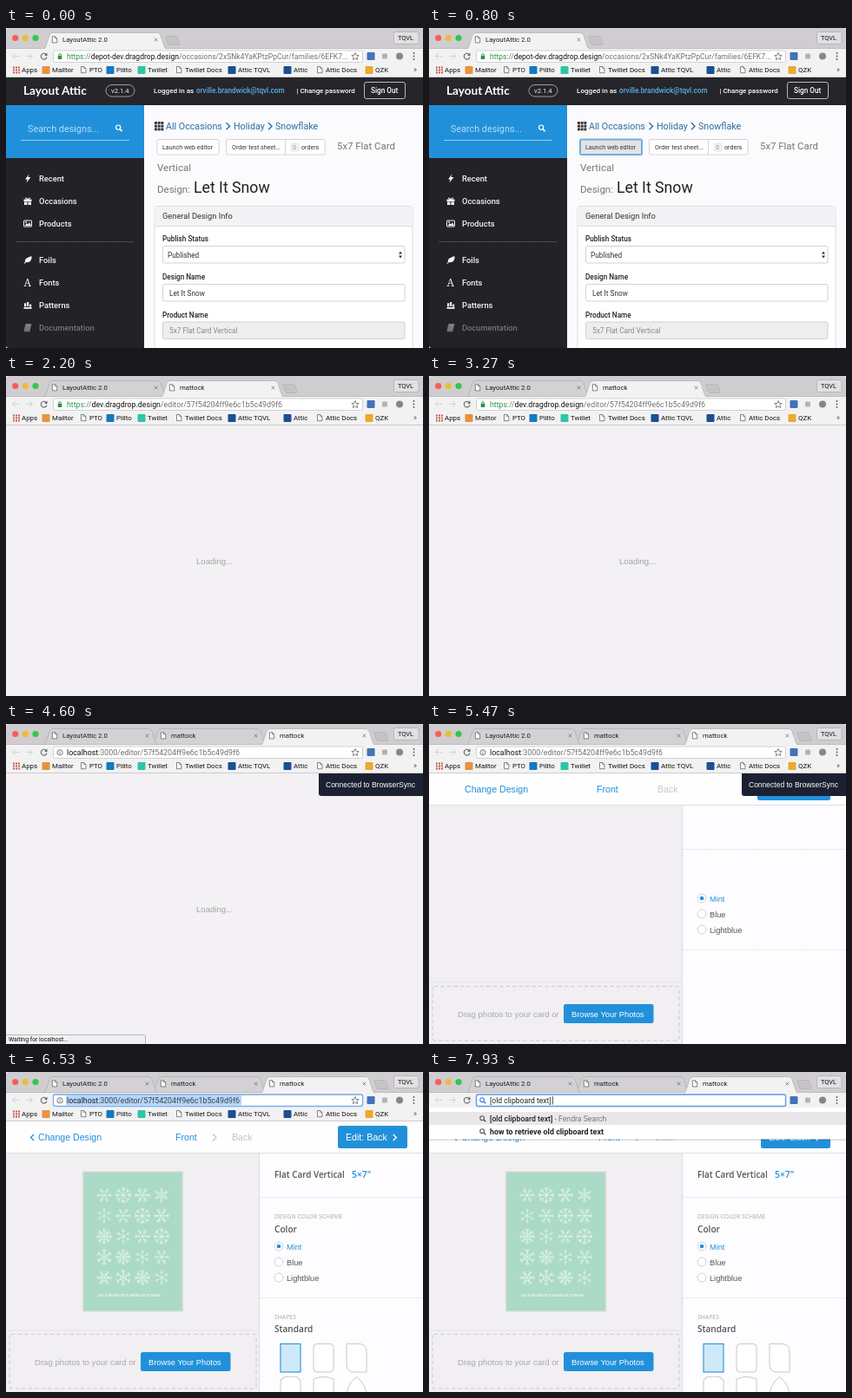
Write an HTML page that moves like this. It is 480x369 px and loops after 8000 ms.

```html
<!DOCTYPE html>
<html lang="en">
<head>
<meta charset="utf-8">
<title>Opening a design in the local editor</title>
<style>
  html, body { margin: 0; width: 100%; height: 100%; overflow: hidden; background: #fff; }
  svg { display: block; width: 100%; height: 100%; font-family: Roboto, sans-serif; }
  text { white-space: pre; }
  .helv { font-family: "Liberation Sans", Arial, sans-serif; }
  .open { font-family: "Open Sans", sans-serif; }
  .lato { font-family: Lato, sans-serif; }
  .serif { font-family: "Noto Serif", serif; }
  .mid { font-weight: 500; }
  .semi { font-weight: 600; }
  .bold { font-weight: 700; }
</style>
</head>
<body>
<svg id="stage" viewBox="0 0 480 369" preserveAspectRatio="none"></svg>
<script>
const LOOP = 8000;
const BLUE = '#2190da', INK = '#252428', GREY = '#727073', LINK = '#2c6ca4';

// Moments at which the picture switches, in ms
const at = {
  hover: 330, press: 600, tab2: 1530, boot2: 2130, tab3: 3340, boot3: 4400,
  sync: 4480, idle: 4870, editor: 5130, fonts: 5800, select: 6270, syncEnd: 6400,
  paste: 7130, suggest: 7330
};

const text = (x, y, size, str, fill = INK, cls = '') =>
  `<text x="${x}" y="${y}" font-size="${size}" fill="${fill}" class="${cls}">${str}</text>`;
const rect = (x, y, w, h, fill, r = 0, stroke = 'none', extra = '') =>
  `<rect x="${x}" y="${y}" width="${w}" height="${h}" fill="${fill}" rx="${r}" stroke="${stroke}" ${extra}/>`;
const circle = (x, y, r, fill, stroke = 'none') =>
  `<circle cx="${x}" cy="${y}" r="${r}" fill="${fill}" stroke="${stroke}"/>`;
const line = (d, stroke, width = 1, extra = '') =>
  `<path d="${d}" fill="none" stroke="${stroke}" stroke-width="${width}" ${extra}/>`;
const shape = (d, fill, extra = '') => `<path d="${d}" fill="${fill}" ${extra}/>`;
const group = (x, y, body) => `<g transform="translate(${x} ${y})">${body}</g>`;
const during = (from, to, body) => `<g data-from="${from}" data-to="${to}">${body}</g>`;
const span = (str, fill) => `<tspan fill="${fill}">${str}</tspan>`;

const docIcon = (x, y) =>
  shape(`M${x} ${y}h3.2l2.2 2.2v5h-5.400z`, '#fff', 'stroke="#666" stroke-width=".8"') +
  line(`M${x + 3.2} ${y}v2.2h2.2`, '#666', .7);
const lens = (x, y, color, s = 1) => group(x, y,
  `<circle cx="${-.8 * s}" cy="${-.8 * s}" r="${2.4 * s}" fill="none" stroke="${color}" stroke-width="${1.1 * s}"/>` +
  line(`M${s} ${s}l${2.3 * s} ${2.3 * s}`, color, 1.4 * s));
const chevron = (x, y, color, s = 3, width = 1.2) =>
  line(`M${x - s / 2} ${y - s}l${s} ${s}l${-s} ${s}`, color, width);
const dots = (x, y, n, step, size, color) => {
  let out = '';
  for (let i = 0; i < n * n; i++)
    out += rect(x + i % n * step, y + Math.floor(i / n) * step, size, size, color);
  return out;
};

/* ---------- browser frame ---------- */

function toolbar() {
  const bookmarks = [
    [18, 'Apps'], [53, 'Mailtor', '#e8923c'], [96, 'PTO'], [127, 'Pillto', '#1579bf'],
    [163, 'Twillet', '#2fc4a8'], [206, 'Twillet Docs'], [267, 'Attic TQVL', '#1c4f94'],
    [331, 'Attic', '#1c4f94'], [368, 'Attic Docs'], [425, 'QZK', '#eba92d']
  ];
  const marks = bookmarks.map(([x, label, color]) => {
    const icon = color ? rect(x - 11.5, 44, 9, 9, color, 1)
      : label === 'Apps' ? dots(8, 44.5, 3, 3, 2, '#c9604e') : docIcon(x - 9.5, 44.5);
    return icon + text(x, 51, 7.9, label, '#111');
  }).join('');
  return rect(0, 24, 480, 33, '#f3f2f3') +
    line('M15 32.500H7.500M11 29L7.500 32.500L11 36M23 32.500h7.500M27 29l3.500 3.500l-3.500 3.500', '#d3d1d4', 1) +
    line('M46.300 30.500A3.400 3.400 0 1 0 47 33.500', '#666', 1.1) + shape('M47.500 28.500v3.500h-3.500z', '#666') +
    rect(54.5, 26, 356, 13.500, '#fff', 2, '#c9c7ca', 'stroke-width=".8"') +
    line('M402 28.500l1.200 2.900 3 .200-2.300 2 .700 3-2.600-1.600-2.600 1.600.700-3-2.300-2 3-.200z', '#666', .8) +
    rect(415.5, 28, 9, 9, '#4272ba', 1) + rect(433, 29.5, 6, 6, '#b5b3b3', 1) +
    circle(453, 32.5, 4, '#85878a') +
    [29, 32.5, 36].map(y => circle(469.5, y, .9, '#555')).join('') +
    marks + text(469, 51, 8.5, '»', '#555') + rect(0, 56.2, 480, .8, '#c6c4c6');
}

function addresses() {
  const lock = rect(59.700, 31.900, 4.600, 4, '#2a9445', .6) + line('M60.700 32v-1a1.300 1.300 0 0 1 2.600 0v1', '#2a9445', .9);
  const info = line('M58.900 32.800a3.100 3.100 0 1 1 6.200 0a3.100 3.100 0 1 1-6.200 0', '#555', .8) +
    rect(61.600, 32.300, .8, 2.300, '#555') + rect(61.600, 30.900, .8, .8, '#555');
  const path = '/editor/57f54204ff9e6c1b5c49d9f6';
  const secure = (host, rest, size) => lock +
    text(70, 35.7, size, span('https', '#2a9445') + span('://', GREY) + span(host, '#111') + span(rest, GREY));
  const local = (host, rest) => info + text(70, 35.7, 8.85, span('localhost', host) + span(':3000' + path, rest));
  return during(0, at.tab2, secure('depot-dev.dragdrop.design', '/occasions/2xSNk4YaKPtzPpCur/families/6EFK7...', 8.55)) +
    during(at.tab2, at.tab3, secure('dev.dragdrop.design', path, 8.8)) +
    during(at.tab3, at.select, local('#111', GREY)) +
    during(at.select, at.paste, rect(54.5, 26, 356, 13.500, 'none', 2, '#79aee9', 'stroke-width="1.4"') +
      rect(69, 27.200, 202, 11.300, '#b3d4fb') + local('#222', '#444'));
}

function suggestions() {
  const query = '[old clipboard text]';
  const box = h => rect(0, 41, 480, h + 1.5, '#0002') + rect(0, 41, 480, h, '#fff') +
    rect(0, 46, 480, 15, '#e9e7e9') + lens(62, 54, '#555') +
    text(70, 56.5, 8.7, `<tspan class="mid">${query}</tspan>` + span(' - Fendra Search', '#777'), '#222');
  return during(at.paste, LOOP, rect(54.5, 26, 356, 13.500, '#fff', 2, '#5b9fe8', 'stroke-width="1.4"') +
      lens(62, 33, '#3b7de0') + text(70, 35.7, 8.6, query, '#222') + rect(142, 28, .7, 9.500, '#222')) +
    during(at.paste, at.suggest, box(22)) +
    during(at.suggest, LOOP, box(36.5) + lens(62, 69, '#555') +
      text(70, 71.5, 8.9, 'how to retrieve old clipboard text', '#222', 'bold'));
}

/* ---------- catalogue page ---------- */

function sidebar() {
  const white = '#f4f4f6', dim = '#77767b';
  const icons = [
    shape('M1.500-5L-3 1h2.500L-1.500 5L3.500-1.500H.5z', white),
    rect(-4.500, -2, 9, 2.500, white) + rect(-4, 1, 3.500, 3.500, white) + rect(.5, 1, 3.500, 3.500, white) +
      line('M0-2C-4-2-3-5.500 0-2C3-5.500 4-2 0-2', white, 1),
    rect(-4.500, -3.500, 9, 7, 'none', .5, white) + shape('M-3.500 2.500l2.500-3 1.500 1.500 1.500-2.500 2 4z', white) + circle(-2, -1.500, .9, white),
    shape('M4.500-4.500C5 1 2 3.500-2 2.500L-4 4.500L-4.500 4L-3 2C-4-2 1-3 4.500-4.500z', white),
    text(-4.500, 4, 12, 'A', white, 'serif'),
    [[-4, 2], [-1, 3], [2, 1]].map(([x, n]) => rect(x, -3.500 + (3 - n) * 1.300, 2.200, 2 + n, white)).join('') + rect(-4.500, 2.500, 9, 1.800, white),
    shape('M-2.500-4.500h7l-2 8h-7z', dim) + line('M-4 4.300h6.500M-.8-2.500h3.500', '#aaa', .7)
  ];
  const labels = ['Recent', 'Occasions', 'Products', 'Foils', 'Fonts', 'Patterns', 'Documentation'];
  return labels.map((label, i) => {
    const y = 173.5 + 26 * i + (i > 2 ? 16 : 0), color = i === 6 ? dim : white;
    return group(25, y, icons[i]) + text(38, y + 3.3, 9.3, label, color, 'mid');
  }).join('') + line('M12 246.500H148', '#858488', .8, 'stroke-dasharray="1 1"');
}

function field(y, label, value, x, fill = '#fff', color = '#333') {
  return text(180, y, 8.2, label, '#222', 'mid') +
    rect(180.5, y + 5.5, 278.5, 19.5, fill, 2, '#c9c7ca', 'stroke-width=".8"') +
    text(x, y + 18.5, 8.25, value, color);
}

function catalogue() {
  const button = (x, w) => rect(x, 128.5, w, 17.500, '#fff', 1.5, '#cbc9cc', 'stroke-width=".8"');
  const launch = text(180, 139.8, 7.1, 'Launch web editor', '#333');
  const crumb = (x, label) => text(x, 117, 10.7, label, LINK);
  return rect(0, 57, 480, 312, '#fbfafc') +
    rect(0, 57, 480, 32, '#262529') + rect(0, 89, 159, 61, BLUE) + rect(0, 150, 159, 219, '#232227') +
    text(20, 76.5, 13.6, 'Layout Attic', '#fff', 'lato bold') +
    rect(115, 65.5, 33, 13.500, 'none', 7, '#bbb', 'stroke-width=".8"') + text(121, 75, 7.6, 'v2.1.4', '#eee') +
    text(170, 75, 8.1, 'Logged in as', '#fff', 'mid') +
    text(219, 75, 8.2, 'orville.brandwick@tqvl.com', '#58b2e8', 'mid') +
    text(334.5, 75, 7.9, '| Change password', '#fff', 'mid') +
    rect(412.5, 62.5, 47, 19, 'none', 2.5, '#ddd', 'stroke-width=".8"') + text(420, 75, 8.2, 'Sign Out', '#fff', 'mid') +
    text(25, 119.5, 10.8, 'Search designs...', '#b5dcf5') + lens(130, 115.5, '#fff', 1.1) +
    rect(17, 129, 125, .9, '#a5d3f0') + sidebar() +
    dots(171, 108, 3, 3.700, 2.900, '#333') +
    crumb(184, 'All Occasions') + chevron(255.5, 113.2, LINK, 4, 1.4) + crumb(262, 'Holiday') +
    chevron(304, 113.2, LINK, 4, 1.4) + crumb(310, 'Snowflake') +
    button(174, 71) + button(253.5, 113.5) + line('M321.500 128.500v17.500', '#cbc9cc', .8) +
    launch + text(260, 139.8, 7.1, 'Order test sheet...', '#333') +
    rect(328, 133, 9, 9, '#f1f0f2', 1, '#ddd', 'stroke-width=".6"') + text(330.3, 139.8, 6.5, '0', '#888') +
    text(340, 139.8, 7.1, 'orders', '#333') +
    during(at.hover, at.press, rect(174, 128.5, 71, 17.500, '#e6e5e8', 1.5, '#adabad', 'stroke-width=".8"') + launch) +
    during(at.press, at.tab2, rect(174, 128.500, 71, 17.500, '#e4e3e6', 1.5, '#72aedd', 'stroke-width="2"') + launch) +
    text(381, 140, 11.4, '5x7 Flat Card', '#777') + text(174, 165, 11.5, 'Vertical', '#777') +
    text(174, 190, 11.5, 'Design:', '#777') + text(216, 190, 17.7, 'Let It Snow', '#222') +
    rect(171, 205.5, 297, 180, '#fff', 3, '#d9d7da', 'stroke-width=".8"') +
    rect(171.5, 206, 296, 22, '#f3f2f4', 2) + rect(171, 228, 297, .8, '#d9d7da') +
    text(180, 220, 9.3, 'General Design Info', '#333') +
    field(246, 'Publish Status', 'Published', 186) +
    shape('M452 260.500l2-3 2 3zM452 262.500l2 3 2-3z', '#333') +
    field(290, 'Design Name', 'Let It Snow', 188) +
    field(333.5, 'Product Name', '5x7 Flat Card Vertical', 188, '#eeedef', '#8a888c');
}

/* ---------- editor ---------- */

function snowflake(x, y, kind) {
  const arms = kind % 3 === 1 ? 8 : 6;
  const branches = [[4, 6.5], [5.5], [3, 5, 7], [6, 7.5]][kind % 4];
  let d = '';
  for (let i = 0; i < arms; i++) {
    const a = 2 * Math.PI * i / arms + (kind % 2 ? Math.PI / 2 : 0);
    const point = (r, turn) => `${(r * Math.cos(a + turn)).toFixed(1)} ${(r * Math.sin(a + turn)).toFixed(1)}`;
    d += `M0 0L${point(9, 0)}`;
    for (const r of branches) d += `M${point(r + 1.4, .28)}L${point(r, 0)}L${point(r + 1.4, -.28)}`;
    if (kind % 5 > 2) d += `M${point(4, 0)}L${point(4, 2 * Math.PI / arms)}`;
  }
  return group(x, y, line(d, '#f3fbf7', .6));
}

function card() {
  let out = rect(88, 114.5, 116, 162, '#d9d9d8', 1) + rect(89.5, 115.500, 113, 159.500, '#abdac7');
  for (let i = 0; i < 20; i++)
    out += snowflake(113 + i % 4 * 22, 142 + Math.floor(i / 4) * 23.800, (i * 7 + Math.floor(i / 4)) % 12);
  return out + text(106.5, 259, 3.75, 'LET IT SNOW LET IT SNOW LET IT SNOW', '#f6fcf9', 'lato bold');
}

function shapes() {
  const plain = 'stroke="#c4c2c5" stroke-width=".9"';
  return rect(316, 313.5, 23, 32.500, '#d0e9f8', 0, BLUE, 'stroke-width="1.1"') +
    rect(354, 313.5, 23, 32.500, '#fff', 4, '#c4c2c5', 'stroke-width=".9"') +
    shape('M392 313.500h14q9 0 9 9v23.500h-14q-9 0-9-9z', '#fff', plain) +
    shape('M316 375v-20q3 0 3-3q8.500-2 17 0q0 3 3 3v20z', '#fff', plain) +
    shape('M354 375v-21q11.500-5 23 0v21z', '#fff', plain) +
    shape('M392 375q0-15 11.500-23.500q11.500 8.500 11.500 23.500z', '#fff', plain);
}

function editor() {
  const radio = (y, label, on) => circle(314, y, 5, '#fff', '#d3d1d4') + (on ? circle(314, y, 2.3, BLUE) : '') +
    text(323, y + 3.5, 9.2, label, on ? BLUE : '#555', 'helv');
  const nav = (x, y, label, color) => text(x, y, 10.6, label, color, 'helv');
  const rule = y => line(`M292 ${y}H480`, '#d9d7da', .8, 'stroke-dasharray="1.5 1"');
  return rect(0, 57, 480, 312, '#f1eff2') + rect(0, 57, 480, 36, '#fefefe') + rect(0, 93, 480, .8, '#dcdadd') +
    rect(291, 94, 1, 275, '#dedce0') + rect(292, 94, 188, 275, '#fdfcfe') + rule(144.5) + rule(260.5) +
    radio(201, 'Mint', true) + radio(219, 'Blue') + radio(237, 'Lightblue') +
    rect(0, 297.5, 291, .8, '#e0dee1') +
    rect(4, 302.5, 284, 62.500, 'none', 2, '#cbc9cc', 'stroke-dasharray="4.500 3"') +
    text(33, 337.5, 9.6, 'Drag photos to your card or', '#a9a7aa', 'helv') +
    rect(155, 323, 103.5, 22, BLUE, 2.5) + text(164, 337.5, 9.3, 'Browse Your Photos', '#fff', 'helv') +
    during(at.editor, at.fonts, nav(41, 79, 'Change Design', BLUE) + nav(193, 79, 'Front', BLUE) +
      nav(263, 79, 'Back', '#c9c7ca') + rect(378, 62, 84, 26, BLUE, 2.5) + nav(391, 79, 'Edit: Back', '#fff')) +
    during(at.fonts, LOOP, line('M32 72l-3.500 3.500l3.500 3.500', BLUE, 1.3) + nav(37, 79, 'Change Design', BLUE) +
      nav(195, 79, 'Front', BLUE) + chevron(240, 75.5, '#c2c0c3', 4) + nav(260, 79, 'Back', '#c5c3c6') +
      rect(382, 62, 80, 26, BLUE, 2.5) + nav(391, 79, 'Edit: Back', '#fff') + chevron(447.5, 75.5, '#fff', 3.5, 1.3) +
      text(309, 122, 9.9, 'Flat Card Vertical', '#555', 'open semi') + text(398, 122, 10.3, '5×7"', BLUE, 'open semi') +
      text(309, 169, 6.9, 'DESIGN COLOR SCHEME', '#aaa8ab', 'open') + text(309, 184.5, 10.1, 'Color', '#555', 'open semi') +
      text(309, 285, 6.9, 'SHAPES', '#aaa8ab', 'open') + text(309, 300, 10.1, 'Standard', '#555', 'open semi') +
      shapes() + card());
}

/* ---------- assembly ---------- */

const loading = rect(0, 57, 480, 312, '#f3f1f4') + text(219, 217, 9.6, 'Loading...', '#a3a1a4', 'helv');
const blank = rect(0, 57, 480, 312, '#fff');
const stage = document.getElementById('stage');

stage.innerHTML = '<clipPath id="win"><rect width="480" height="369" rx="3"/></clipPath><g clip-path="url(#win)">' +
  rect(0, 0, 480, 24, '#cfcdd0') + '<g id="tabs"></g>' +
  circle(10.7, 11.5, 3.600, '#fb5c56') + circle(22.3, 11.5, 3.600, '#eebd35') + circle(34, 11.5, 3.600, '#32c748') +
  rect(446.5, 4.5, 28.5, 14, '#e2e0e3', 2, '#b1afb2', 'stroke-width=".8"') + text(451, 14.3, 7.4, 'TQVL', '#111') +
  toolbar() + addresses() +
  during(0, at.tab2, catalogue()) +
  during(at.tab2, at.boot2, blank) + during(at.boot2, at.tab3, loading) +
  during(at.tab3, at.boot3, blank) + during(at.boot3, at.editor, loading) +
  during(at.editor, LOOP, editor()) +
  during(at.tab3 + 190, at.idle, rect(-1, 358.5, 161.5, 12, '#f1eff2', 1.5, '#a9a7aa', 'stroke-width=".8"') +
    text(3, 366.200, 6.9, 'Waiting for localhost...', '#111')) +
  during(at.sync, at.syncEnd, shape('M360 57H480V83H363q-3 0-3-3z', '#1b2032') +
    text(368, 73, 8.5, 'Connected to BrowserSync', '#fff', 'helv')) +
  suggestions() + '</g>';

const timed = [...stage.querySelectorAll('[data-from]')];
const tabBar = document.getElementById('tabs');
const ease = p => 1 - (1 - Math.min(1, Math.max(0, p))) ** 2;

function tab(x, w, title, active) {
  const outline = `M${x - 2} 24.500q3 0 4-4l4-12q1-3 4-3H${x + w - 5}q3 0 4 3l4 12q1 4 4 4`;
  const body = shape(outline, active ? '#f3f2f3' : '#d3d1d4', 'stroke="#aeacaf" stroke-width=".7"');
  if (w < 70) return body;
  const close = x + w - 6.500;
  return body + docIcon(x + 9.3, 9.7) + text(x + 21, 16, 7.75, title, '#1c1c1e') +
    line(`M${close - 1.8} 11.700l3.600 3.600m0-3.600l-3.600 3.600`, '#666', .8);
}

function drawTabs(t) {
  const second = ease((t - at.tab2) / 190), third = ease((t - at.tab3) / 190);
  const pitch = 135 - 10 * third;
  const widths = [pitch, pitch * second, pitch * third];
  const titles = ['LayoutAttic 2.0', t < at.boot2 ? 'Loading...' : 'mattock', t < at.boot3 ? 'Loading...' : 'mattock'];
  const active = t < at.tab2 ? 0 : t < at.tab3 ? 1 : 2;
  const left = i => 44 + widths.slice(0, i).reduce((a, b) => a + b, 0);
  const one = i => widths[i] > 1 ? tab(left(i), widths[i], titles[i], i === active) : '';
  const others = [2, 1, 0].filter(i => i !== active).map(one).join('');
  tabBar.innerHTML = shape(`M${left(3) + 6} 9.500h10q2 0 2.500 1.500l2.500 7q.5 1.500-1.500 1.500h-9.500q-2 0-2.500-1.500l-2.500-7q-.5-1.500 1-1.500z`,
    '#c5c3c6', 'stroke="#b1afb2" stroke-width=".7"') + others + rect(0, 23.500, 480, .7, '#aeacaf') + one(active);
}

const start = performance.now();

function frame() {
  const t = (performance.now() - start) % LOOP;
  for (const el of timed)
    el.style.display = t >= el.dataset.from && t < el.dataset.to ? '' : 'none';
  drawTabs(t);
  requestAnimationFrame(frame);
}
frame();
</script>
</body>
</html>
```
